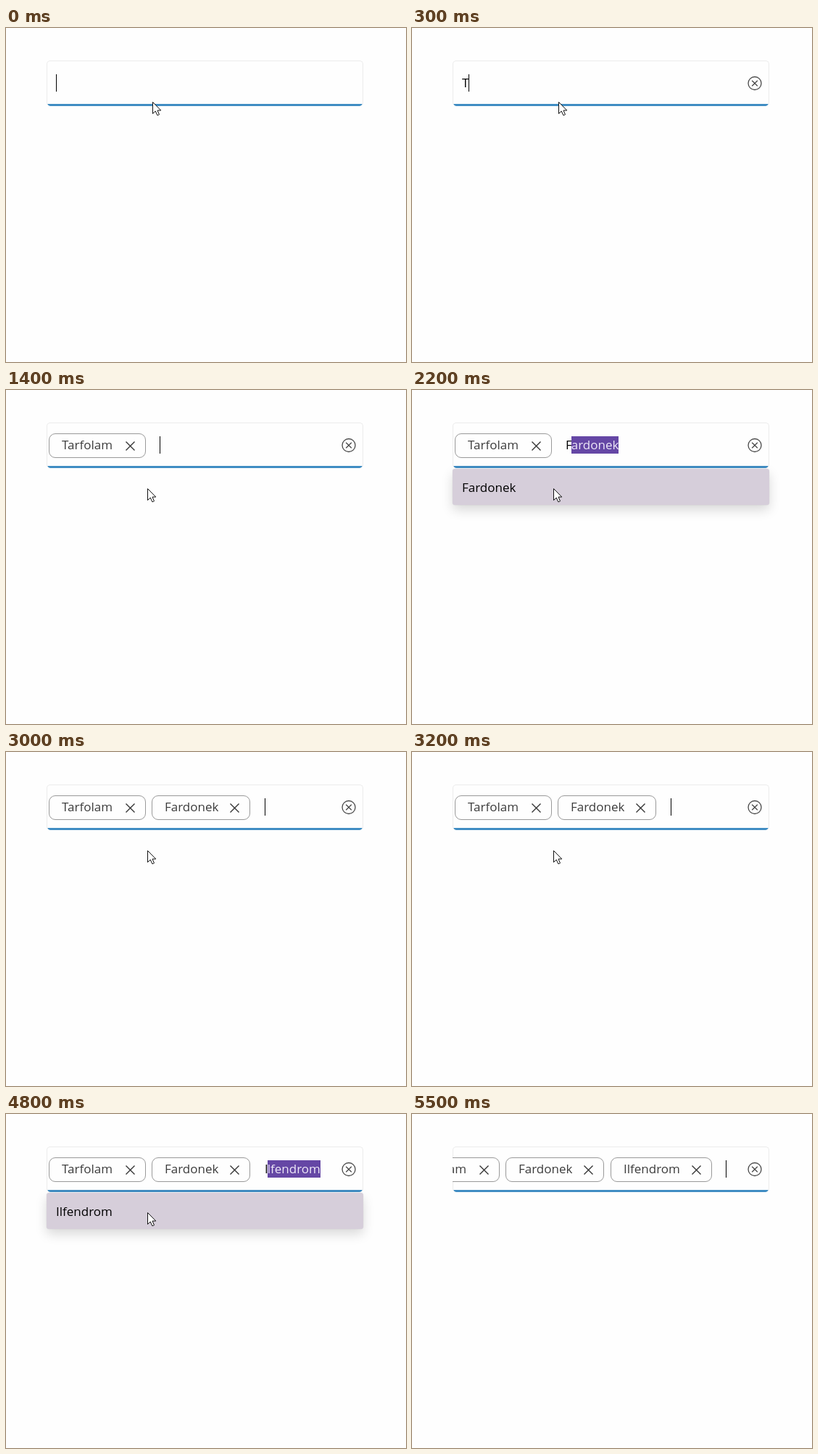
An HTML page for the animation above (6500 ms loop, 552 by 462 pixels).

```html
<!DOCTYPE html>
<html lang="en">
<head>
<meta charset="utf-8">
<title>Token autocomplete</title>
<style>
html, body { margin: 0; width: 552px; height: 462px; overflow: hidden; background: #fefefe; }
body { position: relative; font: 17px/24px "Open Sans", "Noto Sans", sans-serif; color: #000; }
div, svg { position: absolute; box-sizing: border-box; white-space: nowrap; }
svg { overflow: visible; fill: none; }
.field { left: 55.5px; top: 45px; width: 437px; height: 63px; border: 1px solid #ececec; border-bottom: 0; border-radius: 5px; background: #fefefe; overflow: hidden; }
.field::after { content: ""; position: absolute; left: 0; right: 0; bottom: 0; height: 3px; background: #408dc3; }
.view { left: 56px; top: 46px; width: 402px; height: 59px; overflow: hidden; }
/* Children of the strip use stage coordinates. */
.strip { left: -56px; top: -46px; width: 552px; height: 120px; }
.chip { top: 60px; height: 34px; border: 1px solid #999; border-radius: 9px; background: #fefefe; color: #3c3c3c; }
.chip span { position: absolute; left: 17px; top: 3px; }
.chip svg { right: 14px; top: 9.5px; stroke: #333; stroke-width: 1.4; }
.edit { top: 64px; height: 24px; display: flex; }
.sel { margin-left: -1px; background: #6547a5; color: #eee8f8; }
.caret { width: 1px; height: 24px; background: #000; }
.clear { left: 463px; top: 66px; stroke: #484848; stroke-width: 1.3; }
.list { left: 55.5px; top: 109px; width: 437px; border-radius: 4px; background: #ede6f4; box-shadow: 0 7px 16px rgba(0,0,0,.15), 0 0 1px rgba(0,0,0,.3); overflow: hidden; }
.row { left: 0; width: 100%; height: 50px; padding: 14px 13.5px 0; }
.row:first-child { background: #d6ceda; }
.mouse { left: 0; top: 0; fill: #fff; stroke: #111; stroke-width: 1; }
</style>
</head>
<body>
<div class="field"></div>
<div class="view"><div class="strip"></div></div>
<svg class="clear" width="20" height="20"><circle cx="10" cy="10.5" r="9"/><path d="M6.2 6.7l7.6 7.6m0-7.6l-7.6 7.6"/></svg>
<div class="list"></div>
<svg class="mouse" width="13" height="20"><path d="M.5 .5V16.5L4.2 13L6.9 18.8L9.5 17.7L7 12H11.8Z"/></svg>
<script>
const LOOP = 6500;
const $ = s => document.querySelector(s);
const strip = $('.strip'), list = $('.list'), clear = $('.clear'), mouse = $('.mouse');

const options = [
  ['Tarfolam', 'Tefirzo', 'Til Hov', 'Torz', 'Tunvek', 'Tyfelio'],
  ['Fardonek'],
  ['Ilfendrom']
];
const chipBox = [[59, 134], [201, 136], [346, 140]];
const editX = [69, 212, 357, 504.5];

// time, chips, mode
const steps = [
  [0, 0, 'idle'], [300, 0, 'typed'], [400, 0, 'open'],
  [1400, 1, 'idle'], [2200, 1, 'open'],
  [3000, 2, 'idle'], [4300, 2, 'open'],
  [5100, 3, 'idle']
];
// time, x, y
const moves = [
  [0, 202, 102], [900, 197, 115], [1000, 189, 131],
  [1100, 194, 136], [1400, 195, 136]
];
const HIDE_MOUSE = 5300;
const SCROLL = { from: 5100, to: 5500, by: -72 };

const at = (table, t) => table.filter(r => r[0] <= t).pop();

const chip = (name, i) => {
  const [x, w] = chipBox[i];
  return `<div class="chip" style="left:${x}px;width:${w}px"><span>${name}</span>` +
    '<svg width="13" height="13"><path d="M.5 .5l12 12m0-12l-12 12"/></svg></div>';
};

function editor(n, mode) {
  const name = n < options.length ? options[n][0] : '';
  const typed = mode === 'idle' ? '' : name[0];
  const tail = mode === 'open'
    ? `<span class="sel">${name.slice(1)}</span>`
    : '<span class="caret"></span>';
  return `<div class="edit" style="left:${editX[n]}px"><span>${typed}</span>${tail}</div>`;
}

function show([, n, mode]) {
  strip.innerHTML = options.slice(0, n).map((o, i) => chip(o[0], i)).join('') + editor(n, mode);
  const open = mode === 'open';
  list.style.display = open ? '' : 'none';
  if (!open) return;
  list.style.height = options[n].length * 50 + 'px';
  list.innerHTML = options[n].map((o, i) => `<div class="row" style="top:${i * 50}px">${o}</div>`).join('');
}

let current;
function draw(t) {
  const step = at(steps, t);
  if (step !== current) show(current = step);
  clear.style.display = t < 300 ? 'none' : '';

  const [, x, y] = at(moves, t);
  mouse.style.transform = `translate(${x}px,${y}px)`;
  mouse.style.display = t < HIDE_MOUSE ? '' : 'none';

  // The scroll advances once every 100 ms.
  const tick = Math.floor(t / 100) * 100;
  const p = Math.min(1, Math.max(0, (tick - SCROLL.from) / (SCROLL.to - SCROLL.from)));
  strip.style.transform = `translateX(${SCROLL.by * (1 - (1 - p) ** 3)}px)`;
}

const start = performance.now();
function frame() {
  draw((performance.now() - start) % LOOP);
  requestAnimationFrame(frame);
}
frame();
</script>
</body>
</html>
```
